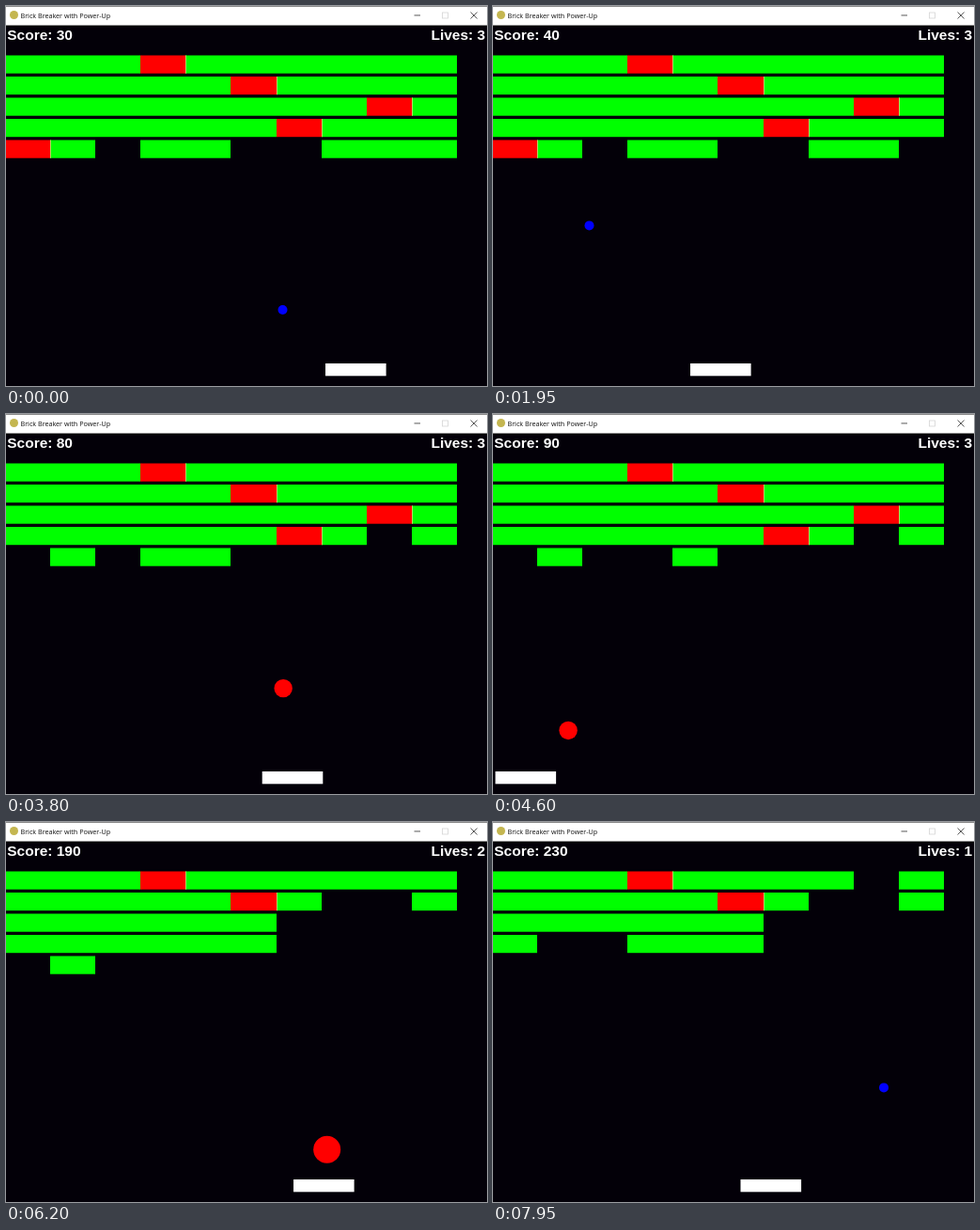
Animation, 512 px wide and 404 px high, one loop 8000 ms. Source, as an HTML page with a canvas:

```html
<!DOCTYPE html>
<html lang="en">
<head>
<meta charset="utf-8">
<title>Brick Breaker with Power-Up</title>
<style>
  html, body { margin: 0; width: 100%; height: 100%; overflow: hidden; background: #030008; }
  canvas { display: block; }
</style>
</head>
<body>
<canvas id="stage" width="512" height="404"></canvas>
<script>
const ctx = document.getElementById('stage').getContext('2d');
const LOOP = 8000, TICK = 50, STEP = 10;
const GREEN = '#00ff00', RED = '#ff0000', BLUE = '#0000ff', WHITE = '#ffffff';

const ROWS = 5, COLS = 10;
const BRICK = { left: -1.7, top: 52.5, dx: 48.2, dy: 22.5, h: 19.2 };
const PADDLE = { y: 380, w: 64.6, h: 13.3, speed: 5.1 };
const redColumns = [3, 5, 8, 6, 0];
const openColumns = [2, 5, 6];  // already missing from the bottom row

// each red brick hit raises the ball's level
const levels = [
  { r: 5, speed: 3.2, color: BLUE },
  { r: 9.7, speed: 4.48, color: RED },
  { r: 14.5, speed: 6.8, color: RED }
];

// the ball rests at its place until the serve time
const serves = [
  { at: 10, x: 294.5, y: 323, dx: 1, dy: 1 },
  { at: 5460, x: 256, y: 212, dx: 1, dy: -1 },
  { at: 6870, x: 256, y: 212, dx: 1, dy: -1 }
];

// where the player heads, and from when
const paddleGoals = [
  { at: 0, x: 340 }, { at: 1130, x: 210 }, { at: 2000, x: 155 },
  { at: 2640, x: 390 }, { at: 3580, x: 2.5 }, { at: 4800, x: 421 },
  { at: 5870, x: 306 }, { at: 6630, x: 200 }, { at: 6950, x: 263.5 }
];

const bricks = [];
for (let row = 0; row < ROWS; row++) {
  for (let col = 0; col < COLS; col++) {
    bricks.push({
      x: BRICK.left + col * BRICK.dx,
      y: BRICK.top + row * BRICK.dy,
      red: redColumns[row] === col,
      goneAt: row === ROWS - 1 && openColumns.includes(col) ? 0 : Infinity
    });
  }
}

const touches = (ball, r, x, y, w, h) =>
  ball.x + r > x && ball.x - r < x + w && ball.y + r > y && ball.y - r < y + h;

function moveBall(ball, paddle, t) {
  const { r, speed } = levels[ball.level];
  ball.x += ball.dx * speed;
  ball.y += ball.dy * speed;
  if (ball.x < r) ball.dx = 1;
  if (ball.x > 512 - r) ball.dx = -1;
  if (touches(ball, r, paddle, PADDLE.y, PADDLE.w, PADDLE.h)) ball.dy = -1;
  for (const b of bricks) {
    if (b.goneAt < Infinity) continue;
    if (!touches(ball, levels[ball.level].r, b.x, b.y, BRICK.dx, BRICK.h)) continue;
    b.goneAt = t;
    ball.dy *= -1;
    if (b.red) ball.level = Math.min(ball.level + 1, levels.length - 1);
  }
}

// Play the game once and keep one state per tick.
function play() {
  const states = [];
  let ball, paddle = paddleGoals[0].x, lives = 4;
  for (let t = 0; t < LOOP; t += STEP) {
    const goal = paddleGoals.filter(g => g.at <= t).pop().x;
    const gap = goal - paddle;
    paddle += Math.sign(gap) * Math.min(Math.abs(gap), PADDLE.speed);
    const serve = serves[4 - lives];
    if (!ball || (serve && t >= serve.at && lives > 1)) {
      ball = { ...serve, level: 0 };
      lives--;
    }
    if (t > ball.at) moveBall(ball, paddle, t);
    if (t % TICK === 0) states.push({ ...ball, paddle, lives });
  }
  return states;
}

function box(x, y, w, h, color) {
  ctx.fillStyle = color;
  ctx.fillRect(x, y, w, h);
}

function disc(x, y, r, color) {
  ctx.fillStyle = color;
  ctx.beginPath();
  ctx.arc(x, y, r, 0, 2 * Math.PI);
  ctx.fill();
}

function label(text, x, y, font, color, align = 'left') {
  ctx.font = font;
  ctx.fillStyle = color;
  ctx.textAlign = align;
  ctx.fillText(text, x, y);
}

function drawTitleBar() {
  box(0, 0, 512, 21, '#8a8a8a');
  box(0, 1, 512, 19, WHITE);
  disc(8.5, 9.5, 4.5, '#c4b650');
  label('Brick Breaker with Power-Up', 15.5, 13, '7.2px "Open Sans", sans-serif', '#111111');
  box(434.5, 9.5, 6.5, 0.9, '#444444');
  ctx.lineWidth = 0.8;
  ctx.strokeStyle = '#d4d4d4';
  ctx.strokeRect(464.5, 7, 6, 6);
  ctx.strokeStyle = '#333333';
  ctx.beginPath();
  ctx.moveTo(494.5, 6.5); ctx.lineTo(501.5, 13.5);
  ctx.moveTo(501.5, 6.5); ctx.lineTo(494.5, 13.5);
  ctx.stroke();
}

function drawBricks(t) {
  const left = bricks.filter(b => b.goneAt > t);
  const span = b => [Math.round(b.x), Math.round(b.x + BRICK.dx)];
  for (const b of left) {
    const [x, right] = span(b);
    box(x, b.y, right - x, BRICK.h, b.red ? RED : GREEN);
  }
  for (const b of left.filter(b => b.red)) box(span(b)[1], b.y, 1, BRICK.h, '#b0e060');
  return bricks.length - left.length;
}

const states = play();

function draw(t) {
  const s = states[Math.floor(t / TICK)];
  const { r, color } = levels[s.level];
  const hud = 'bold 15.5px "Liberation Sans", Arial, sans-serif';
  box(0, 0, 512, 404, '#030008');
  drawTitleBar();
  const gone = drawBricks(Math.floor(t / TICK) * TICK);
  box(s.paddle, PADDLE.y, PADDLE.w, PADDLE.h, WHITE);
  disc(s.x, s.y, r, color);
  label('Score: ' + gone * 10, 1.2, 36, hud, WHITE);
  label('Lives: ' + s.lives, 510.2, 36, hud, WHITE, 'right');
}

const start = performance.now();
function frame() {
  draw((performance.now() - start) % LOOP);
  requestAnimationFrame(frame);
}
frame();
</script>
</body>
</html>
```
